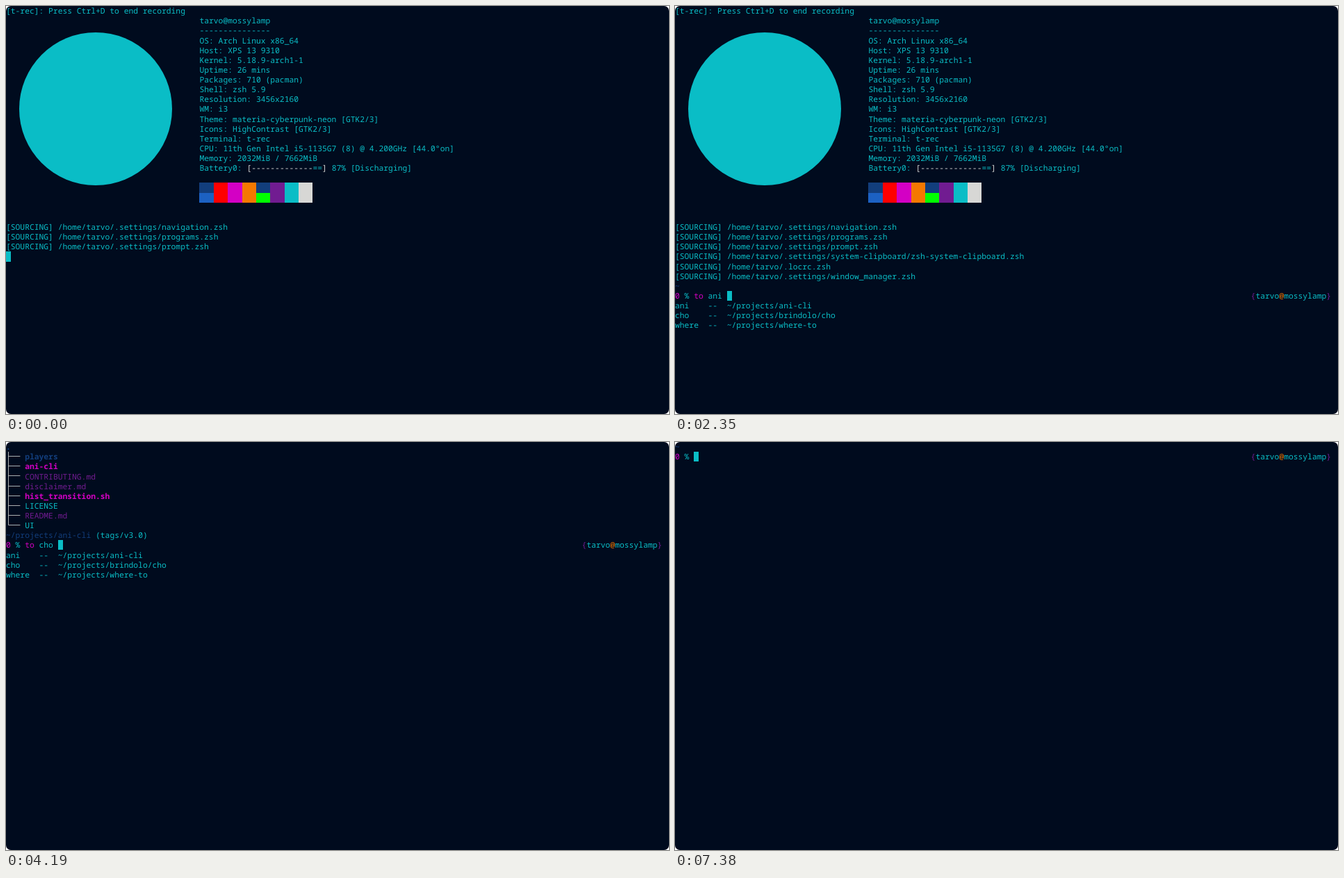
An HTML page that plays this animation: 954x587 px, repeating every 7.64 s.

```html
<!DOCTYPE html>
<html lang="en">
<head>
<meta charset="utf-8">
<title>Terminal session</title>
<style>
  html, body { margin: 0; width: 100%; height: 100%; overflow: hidden; background: #fff; }
  svg { display: block; width: 954px; height: 587px; }
  text {
    font: 500 11.32px "Noto Sans Mono", monospace;
    white-space: pre;
    text-rendering: geometricPrecision;
  }
  .bold { font-weight: 700; }
  .underlined { text-decoration: underline; }
</style>
</head>
<body>
<svg id="terminal" viewBox="0 0 954 587"></svg>
<script>
const LOOP = 7640, CELL_W = 6.792, CELL_H = 14.135;
const NAVY = '#123e7c', RED = '#ff0000', MAGENTA = '#d300c4', ORANGE = '#f57800',
      PURPLE = '#711c91', CYAN = '#0abdc6', WHITE = '#d7d7d5', BLUE = '#1c61c2', GREEN = '#00ff00';
const USER = 'tarvo', HOST = 'mossylamp';
const CHO_PATH = '~/projects/brindolo/cho';

const terminal = document.getElementById('terminal');
let markup = '';

function put(row, col, text, color = CYAN, style = '') {
  markup += `<text x="${col * CELL_W}" y="${row * CELL_H + 11.1}" fill="${color}" class="${style}">${text}</text>`;
}

function block(row, col, cols, color) {
  const x = Math.round(col * CELL_W), y = Math.round(row * CELL_H);
  const w = Math.round((col + cols) * CELL_W) - x, h = Math.round((row + 1) * CELL_H) - y;
  markup += `<rect x="${x}" y="${y}" width="${w}" height="${h}" fill="${color}"/>`;
}

function promptLine(row, command = '', cursor = true) {
  const [name, ...args] = command.split(' ');
  put(row, 0, '0', MAGENTA);
  put(row, 2, '%');
  put(row, 4, name, MAGENTA);
  if (args.length) put(row, 5 + name.length, args.join(' '));
  if (cursor) block(row, 4 + command.length, 1, CYAN);
  put(row, 122, '{', PURPLE);
  put(row, 123, USER);
  put(row, 128, '@', ORANGE);
  put(row, 129, HOST);
  put(row, 138, '}', PURPLE);
}

function completions(row) {
  [['ani', '~/projects/ani-cli'], ['cho', CHO_PATH], ['where', '~/projects/where-to']]
    .forEach(([name, path], i) => {
      put(row + i, 0, name);
      put(row + i, 7, '--');
      put(row + i, 11, path);
    });
}

const SYSTEM = [
  ['OS', 'Arch Linux x86_64'], ['Host', 'XPS 13 9310'], ['Kernel', '5.18.9-arch1-1'],
  ['Uptime', '26 mins'], ['Packages', '710 (pacman)'], ['Shell', 'zsh 5.9'],
  ['Resolution', '3456x2160'], ['WM', 'i3'], ['Theme', 'materia-cyberpunk-neon [GTK2/3]'],
  ['Icons', 'HighContrast [GTK2/3]'], ['Terminal', 't-rec'],
  ['CPU', '11th Gen Intel i5-1135G7 (8) @ 4.200GHz [44.0°on]'], ['Memory', '2032MiB / 7662MiB']
];
const SOURCED = [
  '.settings/navigation.zsh', '.settings/programs.zsh', '.settings/prompt.zsh',
  '.settings/system-clipboard/zsh-system-clipboard.zsh', '.locrc.zsh', '.settings/window_manager.zsh'
];

function systemInfo(sourcedCount) {
  put(0, 0, '[t-rec]: Press Ctrl+D to end recording');
  markup += `<circle cx="129" cy="148" r="110" fill="${CYAN}"/>`;
  put(1, 41, `${USER}@${HOST}`);
  put(2, 41, '-'.repeat(15));
  SYSTEM.forEach(([label, value], i) => put(3 + i, 41, `${label}: ${value}`));
  put(16, 41, 'Battery0:');
  put(16, 51, '[' + '-'.repeat(13), WHITE);
  put(16, 65, '==');
  put(16, 67, ']', WHITE);
  put(16, 69, '87% [Discharging]');
  const palette = [NAVY, RED, MAGENTA, ORANGE, NAVY, PURPLE, CYAN, WHITE];
  const bright = [BLUE, RED, MAGENTA, ORANGE, GREEN, PURPLE, CYAN, WHITE];
  [palette, bright].forEach((colors, r) =>
    colors.forEach((color, i) => block(18 + r, 41 + 3 * i, 3, color)));
  SOURCED.slice(0, sourcedCount).forEach((file, i) =>
    put(22 + i, 0, `[SOURCING] /home/${USER}/${file}`));
}

function booting() {
  systemInfo(3);
  block(25, 0, 1, CYAN);
}

function home(command, list) {
  systemInfo(6);
  put(28, 0, '~', NAVY);
  promptLine(29, command);
  if (list) completions(30);
}

// Lists files as a tree and returns the row after it.
function tree(groups) {
  const files = groups.flatMap(([names, color, style]) =>
    names.split(' ').map(name => [name, color, style]));
  const centre = row => Math.round((row + 0.5) * CELL_H) - 0.5;
  let path = `M3.5 14V${centre(files.length)}`;
  put(0, 0, '.', NAVY, 'bold');
  files.forEach(([name, color, style], i) => {
    path += `M3.5 ${centre(i + 1)}H20.4`;
    put(i + 1, 4, name, color, style);
  });
  markup += `<path d="${path}" fill="none" stroke="${WHITE}" stroke-opacity=".8"/>`;
  return files.length + 1;
}

function pathLine(row, path, branch) {
  put(row, 0, path, NAVY);
  put(row, path.length + 1, `(${branch})`);
}

function aniProject(command, list) {
  const row = tree([
    ['players', NAVY, 'bold'], ['ani-cli', MAGENTA, 'bold'],
    ['CONTRIBUTING.md disclaimer.md', PURPLE], ['hist_transition.sh', MAGENTA, 'bold'],
    ['LICENSE', CYAN], ['README.md', PURPLE], ['UI', CYAN]
  ]);
  pathLine(row, '~/projects/ani-cli', 'tags/v3.0');
  promptLine(row + 1, command);
  if (list) completions(row + 2);
}

function choProject(command, cursor) {
  const row = tree([
    ['cli database exception gin_logs microservices models scripts security system', NAVY, 'bold'],
    ['adi build_docker.sh', MAGENTA, 'bold'], ['Caddyfile go.mod go.sum', CYAN],
    ['Makefile', ORANGE, 'bold underlined'], ['readme.md', PURPLE]
  ]);
  pathLine(row, CHO_PATH, 'master');
  promptLine(row + 1, command, cursor);
}

function backHome(command, cursor) {
  choProject('cd', false);
  put(19, 0, '~', NAVY);
  promptLine(20, command, cursor);
}

function cleared(cursor) {
  put(0, 0, '~', NAVY);
  promptLine(1, '', cursor);
}

const TIMELINE = [
  [0, booting],
  [250, home, ''], [520, home, 't'], [770, home, 'to'], [1040, home, 'to '],
  [1300, home, 'to ', true], [1560, home, 'to a', true], [1820, home, 'to an', true],
  [2080, home, 'to ani', true], [2350, home, 'to ani ', true],
  [2620, aniProject, ''], [2880, aniProject, 't'], [3140, aniProject, 'to'],
  [3420, aniProject, 'to '], [3690, aniProject, 'to ', true],
  [3950, aniProject, 'to ani ', true], [4190, aniProject, 'to cho ', true],
  [4460, choProject, '', true], [4720, choProject, '', false],
  [4970, choProject, 'c', true], [5230, choProject, 'cd', true],
  [5500, backHome, '', true], [5760, backHome, '', false], [6040, backHome, '', true],
  [6300, backHome, 'c', true], [6570, backHome, 'cls', true],
  [6850, cleared, true], [7130, cleared, false], [7380, cleared, true]
];

let shown = null;
function render() {
  const time = performance.now() % LOOP;
  const step = TIMELINE.findLast(([start]) => start <= time);
  if (step !== shown) {
    shown = step;
    const [, scene, ...args] = step;
    markup = '<rect width="954" height="587" rx="7" fill="#000b1e"/>';
    scene(...args);
    terminal.innerHTML = markup;
  }
  requestAnimationFrame(render);
}
render();
</script>
</body>
</html>
```
